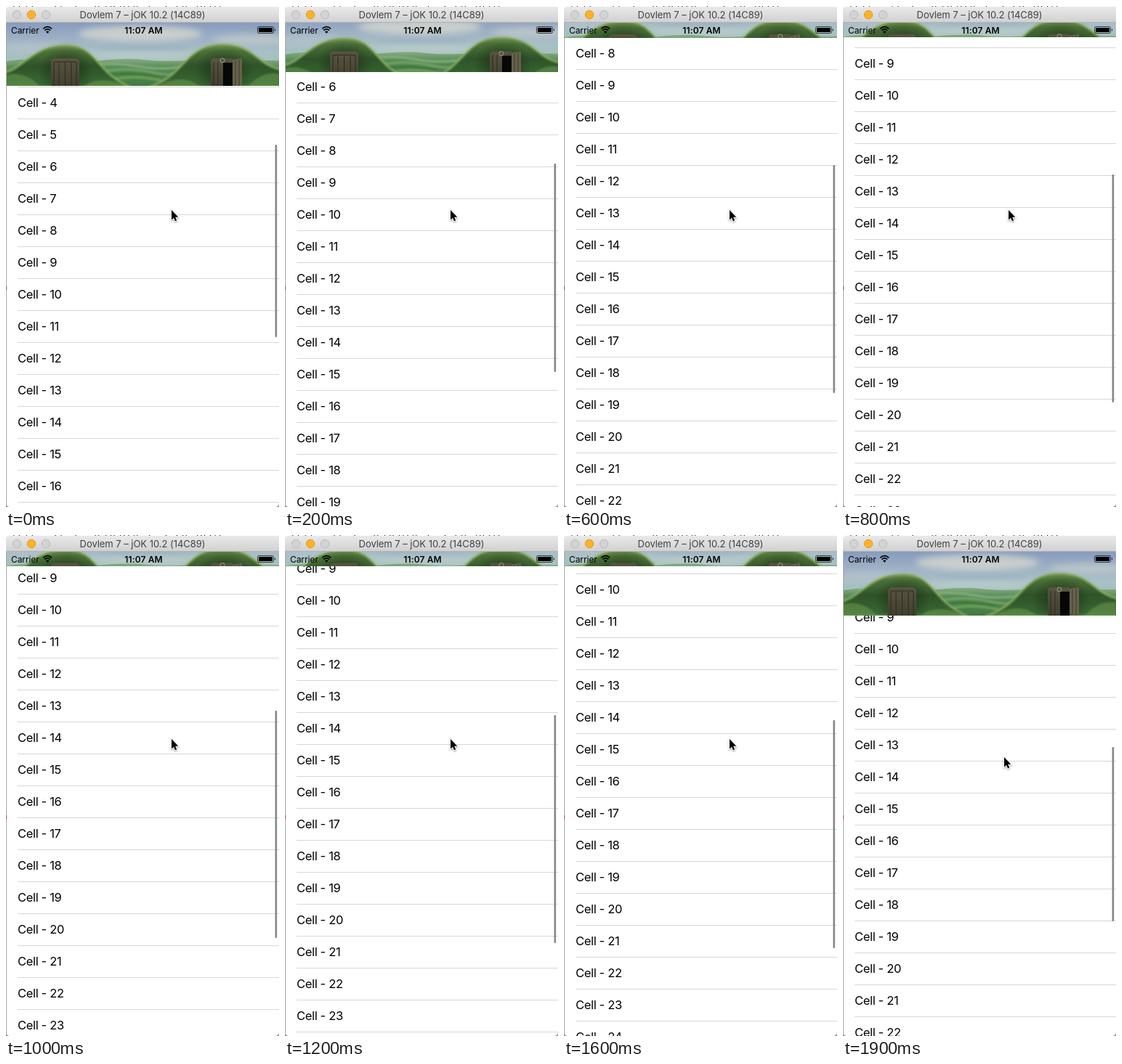
Recreate the animation shown at these times as an HTML page. Size 376 by 690 pixels, loop 2 s.

```html
<!DOCTYPE html>
<html lang="en">
<head>
<meta charset="utf-8">
<title>Collapsing header</title>
<style>
  html, body { margin: 0; width: 100%; height: 100%; overflow: hidden; background: #fff; }
  svg { display: block; width: 376px; height: 690px; }
  text { font-family: Inter, Roboto, sans-serif; }
  #list text { font-size: 16.5px; letter-spacing: -.34px; }
  #list path { stroke: #d7d7da; }
</style>
</head>
<body>
<svg viewBox="0 0 376 690" xmlns="http://www.w3.org/2000/svg">
  <defs>
    <linearGradient id="bar" x2="0" y2="1">
      <stop stop-color="#e9e9e9"/><stop offset="1" stop-color="#d0d0d0"/>
    </linearGradient>
    <linearGradient id="sky" x2="0" y2="1">
      <stop stop-color="#8499bd"/><stop offset=".4" stop-color="#9db0c4"/>
      <stop offset=".7" stop-color="#a9c0c6"/><stop offset="1" stop-color="#a3c0b8"/>
    </linearGradient>
    <linearGradient id="field" x2="0" y2="1">
      <stop stop-color="#86ad86"/><stop offset=".3" stop-color="#568c55"/><stop offset="1" stop-color="#41793f"/>
    </linearGradient>
    <linearGradient id="hill" x2="0" y2="1">
      <stop stop-color="#6b8c4c"/><stop offset=".16" stop-color="#4a7038"/>
      <stop offset=".5" stop-color="#2f5329"/><stop offset="1" stop-color="#396a34"/>
    </linearGradient>
    <radialGradient id="shade">
      <stop stop-color="#15230f" stop-opacity=".8"/><stop offset="1" stop-color="#15230f" stop-opacity="0"/>
    </radialGradient>
    <linearGradient id="wood" x2="0" y2="1">
      <stop stop-color="#585440"/><stop offset="1" stop-color="#403e2e"/>
    </linearGradient>
    <filter id="soft" x="-20%" y="-60%" width="140%" height="220%"><feGaussianBlur stdDeviation="4"/></filter>
    <filter id="haze" x="-5%" y="-20%" width="110%" height="140%"><feGaussianBlur stdDeviation="1.3"/></filter>
    <clipPath id="crop"><rect id="window" y="23" width="376" height="87"/></clipPath>
    <clipPath id="sliver"><rect width="376" height="2"/></clipPath>
    <path id="left" d="M-5 92C24 88 36 54 82 54C126 54 122 91 172 112H-5Z"/>
    <path id="right" d="M196 112C248 96 246 53 298 53C343 53 345 82 381 88V112Z"/>
  </defs>

  <rect width="376" height="690" fill="#fff"/>
  <g id="list"></g>
  <rect id="thumb" x="370.6" width="2.6" rx="1.3" fill="#858585"/>

  <g clip-path="url(#crop)">
    <g id="scene">
      <rect y="20" width="376" height="62" fill="url(#sky)"/>
      <g filter="url(#soft)">
        <ellipse cx="185" cy="38" rx="85" ry="11" fill="#d8dbd0" opacity=".75"/>
        <ellipse cx="35" cy="56" rx="45" ry="6" fill="#b9c5cb" opacity=".6"/>
        <ellipse cx="190" cy="57" rx="65" ry="3" fill="#8ca5b8" opacity=".6"/>
        <ellipse cx="340" cy="46" rx="55" ry="7" fill="#ccd2cd" opacity=".6"/>
        <ellipse cx="190" cy="69" rx="80" ry="4" fill="#c6d5d0" opacity=".7"/>
      </g>
      <path d="M0 76Q30 71 60 75T130 75T190 74T255 75T320 74T376 75V112H0Z" fill="url(#field)"/>
      <g fill="none" filter="url(#haze)">
        <path d="M110 83Q145 76 180 83T260 81" stroke="#83ac7c" stroke-width="3"/>
        <path d="M125 92Q165 83 200 91T250 88" stroke="#73a267" stroke-width="3"/>
        <path d="M125 97Q165 89 210 98" stroke="#356c38" stroke-width="3" opacity=".6"/>
        <path d="M140 103Q175 93 215 103" stroke="#6a9c58" stroke-width="4"/>
      </g>
      <use href="#left" fill="url(#hill)"/>
      <use href="#right" fill="url(#hill)"/>
      <g fill="none" stroke="#8bac62" stroke-width="3.500" stroke-opacity=".75" filter="url(#haze)">
        <use href="#left"/>
        <use href="#right"/>
      </g>
      <path d="M0 95Q28 89 48 112H0ZM105 112Q130 92 170 112ZM332 112Q352 89 376 93V112ZM205 112Q245 90 268 112Z" fill="#6a9a50" opacity=".55" filter="url(#haze)"/>
      <ellipse cx="82" cy="90" rx="38" ry="33" fill="url(#shade)"/>
      <ellipse cx="300" cy="90" rx="40" ry="33" fill="url(#shade)"/>
      <path d="M62 112V75L66 72H97L101 75V112Z" fill="url(#wood)"/>
      <path d="M66 112V77H97V112M81.500 77V112M73 78V112M90 78V112" fill="none" stroke="#2c2b20"/>
      <path d="M282 112V74L285 72H312V112Z" fill="url(#wood)"/>
      <path d="M286 112V77M292 77V112" stroke="#2c2b20"/>
      <path d="M299 112V78H312V112Z" fill="#050806"/>
      <path d="M312 108V74L325 72V112Z" fill="#66624c"/>
      <path d="M316 75V109M321 74V110" stroke="#3d3b2d"/>
      <circle cx="298" cy="75" r="3" fill="none" stroke="#99a08a"/>
    </g>
  </g>

  <text x="7" y="37.500" font-size="12" letter-spacing="-.1">Carrier</text>
  <g fill="none" stroke="#000" stroke-width="1.700">
    <path d="M51.300 31.300Q57.200 26 63.100 31.300M53.300 33.700Q57.200 30.200 61.100 33.700"/>
    <path d="M57.200 37.800L55 35.500Q57.200 33.700 59.400 35.500Z" fill="#000" stroke="none"/>
  </g>
  <text x="189.500" y="37.500" font-size="12" font-weight="600" text-anchor="middle" letter-spacing=".12">11:07 AM</text>
  <rect x="346.500" y="28.500" width="22" height="9" rx="2" fill="none" stroke="#000" stroke-opacity=".7"/>
  <rect x="348" y="30" width="19" height="6" rx=".6"/>
  <path d="M370 31.300Q372 33 370 34.700Z"/>

  <rect width="376" height="4" fill="#fff"/>
  <text x="7" y="0" clip-path="url(#sliver)" font-size="11" style="font-family:'DejaVu Sans Mono',monospace">(gap, step, by: fjpgqygjy(pageTopSyg, gjpy))</text>
  <path d="M0 23V5Q0 1 5 1H376V23Z" fill="url(#bar)"/>
  <path d="M0 22.500H376" stroke="#b3b3b3"/>
  <g fill="#d3d3d3" stroke="#bcbcbc">
    <circle cx="15" cy="12" r="5.700"/>
    <circle cx="35" cy="12" r="5.700" fill="#fdb225" stroke="#e09c1e"/>
    <circle cx="55" cy="12" r="5.700"/>
  </g>
  <text x="188" y="17" font-size="13" fill="#414141" text-anchor="middle" letter-spacing="-.04">Dovlem 7 – jOK 10.2 (14C89)</text>

  <path d="M.5 23V690" stroke="#a8a8a8"/>
  <rect y="386" width="1" height="5" fill="#b8405e"/>
  <path d="M0 690V684Q0 690 6 690ZM376 690V684Q376 690 370 690Z" fill="#8e8e8e"/>
  <path id="cursor" d="M0 0V13.500L3 10.700L5 15.300L7.200 14.400L5.200 9.800H9.300Z" stroke="#fff" stroke-width="1.800" paint-order="stroke" style="filter:drop-shadow(0 1px 1px #0006)"/>
</svg>
<script>
const LOOP = 2000, STEP = 100, ROW = 44;
const el = id => document.getElementById(id);
const move = (id, x, y) => el(id).setAttribute("transform", `translate(${x} ${y})`);

el("list").innerHTML = Array.from({ length: 27 }, (_, i) =>
  `<text x="16" y="${i * ROW + 6}">Cell - ${i}</text><path d="M16 ${i * ROW + 22.5}H376"/>`
).join("");

// time, list y, header bottom, thumb top, thumb end
const fling = [
  [0, -43, 110, 191, 456],
  [200, -153, 91, 217, 504],
  [400, -225, 68, 222, 527],
  [600, -287, 44, 219, 533]
];
const pull = [
  [1700, -367, 43, 256, 570],
  [1800, -323, 81, 275, 550],
  [1900, -283, 111, 292, 532]
];

function between(keys, t) {
  let i = 0;
  while (i < keys.length - 2 && t > keys[i + 1][0]) i++;
  const a = keys[i], b = keys[i + 1];
  const k = (t - a[0]) / (b[0] - a[0]);
  return a.map((v, j) => v + (b[j] - v) * k).slice(1);
}

// free scrolling slows down by 0.2 % per millisecond
function coast(t) {
  const y = -377 + 60 * 0.998 ** (t - 800);
  const top = 232 - 0.485 * (y + 317);
  return [y, 43, top, top + 313.5];
}

function pose(t) {
  if (t <= 600) {
    const p = between(fling, t);
    p[0] -= 7 * Math.sin(Math.PI * (t % 200) / 200) * (t < 400);
    return p;
  }
  return t < 1700 ? coast(t) : between(pull, t);
}

function draw(t) {
  const [y, head, top, end] = pose(t).map(Math.round);
  const drag = Math.max(0, (t - 1700) / 200);
  move("list", 0, y);
  move("scene", 0, (Math.min(head, 110) - 110) / 2);
  move("cursor", 228 - 6 * drag, 281 + 25 * drag);
  el("window").setAttribute("height", head - 23);
  el("thumb").setAttribute("y", top);
  el("thumb").setAttribute("height", end - top);
}

const start = performance.now();
function tick() {
  const t = (performance.now() - start) % LOOP;
  draw(Math.floor(t / STEP) * STEP);
  requestAnimationFrame(tick);
}
tick();
</script>
</body>
</html>
```
